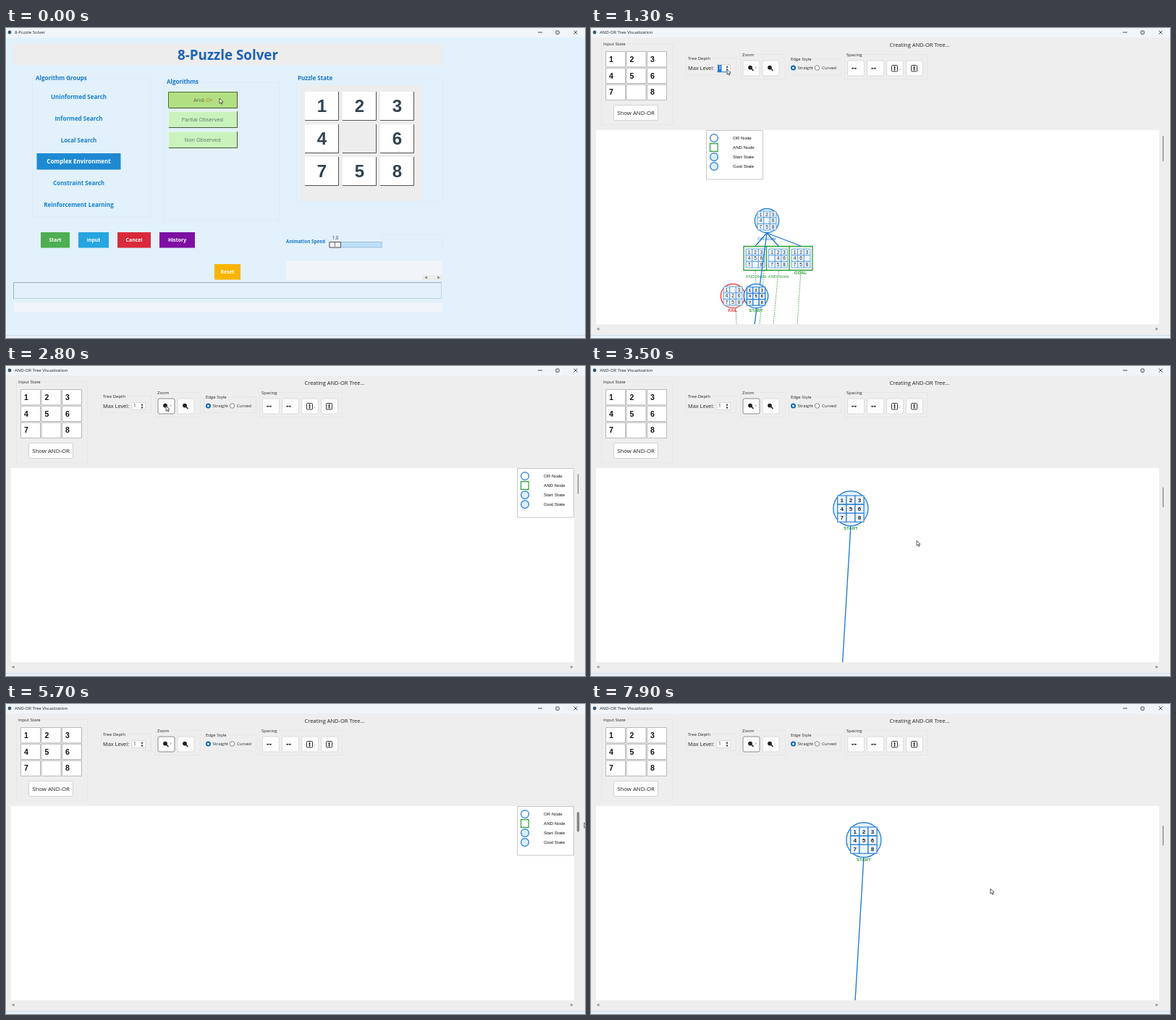
An HTML page with a canvas that plays this animation: 800x428 px, repeating every 8000 ms.

```html
<!DOCTYPE html>
<html lang="en">
<head>
<meta charset="utf-8">
<title>8-Puzzle Solver</title>
<style>
html, body { margin: 0; width: 100%; height: 100%; overflow: hidden; background: #e2f1fb; }
canvas { display: block; }
</style>
</head>
<body>
<canvas id="stage" width="800" height="428"></canvas>
<script>
const g = document.getElementById('stage').getContext('2d');
const LOOP = 8000;
const OPEN_AT = 400, MAX_AT = 800, REDRAW_AT = 1600, ZOOM_AT = [2600, 2800];
const UI = '"Open Sans", "Noto Sans", sans-serif';
const ARIAL = '"Liberation Sans", Arial, sans-serif';
const BLUE = '#1976d2', GREEN = '#2e9e3a', GREY = '#eeeeee', SKY = '#e2f1fb';

// Keyframes: [time, x, y]
const POINTER = [
  [0, 295, 97], [250, 295, 97], [650, 618, 19], [850, 618, 19], [1150, 188, 57],
  [1650, 188, 57], [2050, 790, 173], [2200, 790, 173], [2550, 221, 55], [2850, 221, 55],
  [3400, 450, 241], [3700, 450, 241], [4100, 470, 290], [4600, 420, 250], [5200, 790, 185],
  [5650, 799, 164], [5900, 799, 164], [6500, 620, 285], [6900, 587, 269], [7900, 552, 255]
];
const SCROLL = [
  [2850, 0, 0], [3450, 191, 274], [3800, 191, 274], [4600, 326, 340], [5500, 0, 0],
  [6000, 0, 0], [6850, 340, 108], [7000, 340, 108], [7850, 173, 283]
];

function at(keys, t) {
  let a = keys[0];
  for (const b of keys) {
    if (t < b[0]) {
      if (a === b) break;
      let k = (t - a[0]) / (b[0] - a[0]);
      k = k * k * (3 - 2 * k);
      return [a[1] + (b[1] - a[1]) * k, a[2] + (b[2] - a[2]) * k];
    }
    a = b;
  }
  return [a[1], a[2]];
}

function text(s, x, y, size, color = '#222', align = 'left', weight = 400, font = UI) {
  g.font = `${weight} ${size}px ${font}`;
  g.fillStyle = color;
  g.textAlign = align;
  g.textBaseline = 'middle';
  g.fillText(s, x, y + size * (font === UI ? .07 : .04));
}

function rect(x, y, w, h, fill, stroke, lw = 1, r = 0) {
  g.beginPath();
  g.roundRect(x, y, w, h, r);
  paint(fill, stroke, lw);
}

function circle(x, y, r, fill, stroke, lw = 1) {
  g.beginPath();
  g.arc(x, y, r, 0, 7);
  paint(fill, stroke, lw);
}

function paint(fill, stroke, lw) {
  if (fill) { g.fillStyle = fill; g.fill(); }
  if (stroke) { g.strokeStyle = stroke; g.lineWidth = lw; g.stroke(); }
}

function line(points, color, lw = 1, dash = []) {
  g.beginPath();
  for (let i = 0; i < points.length; i += 2) g.lineTo(points[i], points[i + 1]);
  g.setLineDash(dash);
  paint(null, color, lw);
  g.setLineDash([]);
}

function triangle(x, y, r, angle, color) {
  g.save();
  g.translate(x, y);
  g.rotate(angle);
  g.beginPath();
  g.moveTo(r, 0);
  g.lineTo(-r, -r);
  g.lineTo(-r, r);
  paint(color);
  g.restore();
}

function titleBar(title, x, y, buttons, color) {
  circle(x, y, 2.4, '#34566f');
  text(title, x + 7, y, 6, color);
  const [a, b, c] = buttons;
  line([a - 3, y, a + 3, y], color, .8);
  rect(b - 2.2, y - 2, 4.4, 4.4, null, color, .8, 1);
  line([c - 2.5, y - 2.5, c + 2.5, y + 2.5], color, .8);
  line([c - 2.5, y + 2.5, c + 2.5, y - 2.5], color, .8);
}

function group(x, y, w, h, color) {
  g.setLineDash([1, 1]);
  rect(x + .5, y + .5, w, h, null, color);
  g.setLineDash([]);
}

function solver() {
  rect(0, 13, 800, 415, SKY);
  rect(10, 22, 593, 29, '#ededed');
  text('8-Puzzle Solver', 306.5, 38, 18.8, '#1c63b8', 'center', 700);

  const edge = '#d6e6f0';
  group(36, 69, 163, 191, edge);
  group(217, 74, 160, 191, edge);
  group(401, 69, 202, 170, edge);
  group(520, 285, 83, 18, edge);
  for (const [s, x, y, w] of [['Algorithm Groups', 41, 69, 71], ['Algorithms', 222, 74, 46], ['Puzzle State', 403, 69, 50]]) {
    rect(x - 2, y - 4, w + 3, 8, SKY);
    text(s, x, y, 8, '#1976c8', 'left', 700);
  }

  rect(42.5, 173, 116, 22.5, '#1e8ad2');
  ['Uninformed Search', 'Informed Search', 'Local Search', 'Complex Environment', 'Constraint Search', 'Reinforcement Learning']
    .forEach((s, i) => text(s, 100.5, 95.7 + i * 29.7, 8, i === 3 ? '#fff' : '#1780cc', 'center', 700));

  ['', 'Partial Observed', 'Non Observed'].forEach((s, i) => {
    const y = 88 + Math.floor(i * 27.5);
    rect(224, y, 96, 23, i ? '#c9f2bd' : '#b2df82');
    line([224.5, y + 22, 224.5, y + .5, 319, y + .5], i ? '#e4f7dc' : '#4d6b35');
    line([225, y + 22.5, 319.5, y + 22.5, 319.5, y], '#46553f');
    text(s, 271.5, y + 11.6, 7.4, '#5d7263', 'center');
  });
  text('And-', 259, 99.6, 7.6, '#56653a');
  text('Or', 276.3, 99.6, 7.6, '#bf7a1c');

  rect(406, 79, 169, 160, '#ededed');
  [...'1234 6758'].forEach((d, i) => {
    const x = 413 + i % 3 * 52, y = 88 + Math.floor(i / 3) * 45;
    rect(x, y, 47, 40, d === ' ' ? '#ededed' : '#fff');
    line([x, y + 39.5, x + 46.5, y + 39.5, x + 46.5, y], '#555');
    text(d, x + 23.5, y + 20.4, 24, '#2f4250', 'center', 700, ARIAL);
  });

  for (const [s, x, y, w, color] of [
    ['Start', 48, 282, 40, '#4eae53'], ['Input', 100, 282, 42, '#26a5df'], ['Cancel', 154, 282, 46, '#d92a3b'],
    ['History', 212, 282, 49, '#7d10a2'], ['Reset', 288, 326, 36, '#f8b400']
  ]) {
    rect(x, y, w, 21.5, color);
    text(s, x + w / 2, y + 10.8, 6.9, '#fff', 'center', 700);
  }

  text('Animation Speed', 387, 295, 6.35, '#1976c8', 'left', 700);
  text('1.0', 455, 290.3, 6.2, '#333', 'center');
  rect(447, 295.5, 72, 7.5, '#bbdefb', '#9db4c5', .8);
  rect(447, 295.5, 15.5, 7.5, '#f2f6f8', '#444', .9);
  line([454.5, 296, 454.5, 302], '#555', .8);

  rect(387, 321, 216, 27, '#f1f5f9');
  rect(575, 341, 28, 7, '#ebebeb');
  triangle(580, 344.5, 1.9, Math.PI, '#888');
  triangle(598, 344.5, 1.9, 0, '#888');
  rect(10.5, 351.5, 591, 22, null, '#c8d3da');
  line([10.5, 374, 10.5, 351.5, 602, 351.5], '#a3aeb5');
  rect(11, 379, 592, 13, '#f0f5fa');
}

function grid(cells, x, y, cell, bold) {
  const left = x - cell * 1.5, top = y - cell * 1.5;
  [...cells].forEach((d, i) => {
    const cx = left + i % 3 * cell, cy = top + Math.floor(i / 3) * cell;
    rect(cx, cy, cell, cell, bold ? '#eef6fd' : '#f0f7fd', bold ? BLUE : '#4b95df', bold ? 1.1 : .8);
    text(d, cx + cell / 2, cy + cell / 2 + .2, cell * (bold ? .66 : .74), '#1b2530', 'center', bold ? 700 : 400, ARIAL);
  });
}

function startNode(x, y, k) {
  circle(x, y, 16.7 * k, '#e3f2fd', BLUE, 1.2);
  grid('1234567 8', x, y + .4, 8.4 * k, true);
  text('START', x, y + 16.7 * k + 3.2, 6, GREEN, 'center', 700, ARIAL);
}

function label(s, x, y, color, weight = 400) {
  text(s, x, y, 6, color, 'center', weight, ARIAL);
}

function fullTree() {
  const down = (x1, y1, x2, y2) => line([x1, y1, x2, y2], '#43a047', 1, [1.5, 1.5]);
  label('OR-Node', 243, 291, BLUE);
  for (const x of [227, 259, 290]) line([243, 283, x, 301], BLUE, 1.3);
  circle(243, 266, 16.7, '#e3f2fd', BLUE, 1.2);
  grid('1234 6758', 243, 266, 8.6);

  down(227, 335, 228, 354);
  down(239, 335, 233, 409);
  down(259, 335, 252, 409);
  down(290, 335, 285, 409);
  down(200, 387, 201, 409);
  ['1234567 8', '123 46758', '12346 758'].forEach((cells, i) => {
    const x = 227 + i * 31.5;
    rect(x - 16, 301.5, 32, 33, '#f4faf4', GREEN, 1.3);
    grid(cells, x, 318, 8.6);
  });
  label('AND-Node', 228, 342.8, GREEN);
  label('AND-Node', 259, 342.8, GREEN);
  label('GOAL', 289.5, 338, GREEN, 700);

  line([243, 283, 226, 409], BLUE, 1.3);
  circle(196, 370, 16.7, '#fdeaea', '#e53935', 1.2);
  grid('1 3426758', 196, 370, 8.6);
  label('FAIL', 196, 390, '#e53935', 700);
  startNode(228, 370, 1);
}

function legend(x, y) {
  rect(x + .5, y + .5, 78, 67.5, '#fff', '#c8c8c8');
  ['OR Node', 'AND Node', 'Start State', 'Goal State'].forEach((s, i) => {
    const cy = y + 11 + i * 13;
    if (i === 1) rect(x + 5.5, cy - 5.3, 10.6, 10.6, '#fff', GREEN, 1.2);
    else circle(x + 11, cy, 5.4, i ? '#dceefb' : '#fff', BLUE, 1.2);
    text(s, x + 37, cy + .3, 6.2, '#111', 'left', 400, ARIAL);
  });
}

function iconButton(x, active) {
  rect(x + .5, 45, 23, 21, '#fcfcfc', active ? '#8c8c8c' : '#dcdcdc', 1, 2);
}

function toolbar(t) {
  const edge = '#dfdfdf';
  for (const [s, x, y, w, h] of [
    ['Input State', 14, 21, 98, 112], ['Tree Depth', 131, 41, 69, 23], ['Zoom', 206, 36, 62, 34],
    ['Edge Style', 273, 42, 72, 22], ['Spacing', 350, 36, 114, 34]
  ]) {
    group(x, y, w, h, edge);
    g.font = `6px ${UI}`;
    rect(x + 2, y - 3, g.measureText(s).width + 3, 7, GREY);
    text(s, x + 3, y + .6, 6);
  }

  [...'1234567 8'].forEach((d, i) => {
    const x = 20 + i % 3 * 28.5, y = 32 + Math.floor(i / 3) * 22.8;
    rect(x + .5, y + .5, 27, 21.3, '#fff', '#b8b8b8');
    text(d, x + 5, y + 11.4, 10.5, '#111', 'left', 700, ARIAL);
  });
  rect(31.5, 106.5, 61, 21, '#fdfdfd', '#d4d4d4', 1, 1.5);
  text('Show AND-OR', 62, 117, 7.8, '#222', 'center');

  const level = t < 1200 ? 4 : t < 1400 ? 3 : t < REDRAW_AT ? 2 : 1;
  const editing = t >= 1200 && t < ZOOM_AT[0];
  text('Max Level:', 134, 55.7, 7.4);
  rect(174, 50.5, 18.5, 10, '#fff', '#d2d2d2', .8);
  if (editing) {
    rect(175, 51, 5.5, 9, '#1976d2');
    line([174, 60.7, 192.5, 60.7], '#1976d2', 1);
  }
  text(level, 177.8, 55.2, 6.5, editing ? '#fff' : '#222', 'center');
  triangle(188, 53.3, 1.5, -Math.PI / 2, '#333');
  triangle(188, 58, 1.5, Math.PI / 2, '#333');

  [209.5, 236.5].forEach((x, i) => {
    iconButton(x, !i && t >= ZOOM_AT[0]);
    circle(x + 10.5, 54.6, 2.9, '#222');
    line([x + 12, 56, x + 15, 59], '#222', 1.6);
    text(i ? '-' : '+', x + 17, 56, 4.5, '#1976d2');
  });
  circle(279.5, 55, 2.5, '#fff', '#0a6ab8', 2);
  text('Straight', 285.5, 55.2, 6);
  circle(312.5, 55, 3.2, '#fff', '#777', .9);
  text('Curved', 319, 55.2, 6);
  for (let i = 0; i < 4; i++) {
    const x = 354 + i * 27;
    iconButton(x);
    if (i < 2) {
      line([x + 6.5, 55.7, x + 12.5, 55.7], '#222', .8);
      triangle(x + 7, 55.7, 1.2, Math.PI, '#222');
      triangle(x + 12, 55.7, 1.2, 0, '#222');
    } else {
      rect(x + 7.5, 51.5, 8, 8.4, '#fff', '#333', 1, 1);
      line([x + 11.5, 53, x + 11.5, 58.3], '#222', .9);
      triangle(x + 11.5, 53.6, 1.3, -Math.PI / 2, '#222');
      triangle(x + 11.5, 57.8, 1.3, Math.PI / 2, '#222');
      text(i < 3 ? '+' : '-', x + 17.5, 57, 4, '#666');
    }
  }
}

function treeCanvas(t, w, h) {
  g.save();
  g.beginPath();
  g.rect(7, 141, w, h);
  g.clip();
  rect(7, 141, w, h, '#fff');
  if (t < REDRAW_AT) {
    fullTree();
    legend(159, 141);
  } else {
    const k = 1.2 ** ZOOM_AT.filter(z => t >= z).length;
    const [sx, sy] = at(SCROLL, t);
    const x = 7 + 377 * k - sx, y = 141 + 229 * k - sy;
    startNode(x, y, k);
    line([x, y + 16.7 * k, x - 24, y + 16.7 * k + 400], BLUE, 1.3);
    legend(706 - sx, 141 - sy);
  }
  g.restore();
}

function scrollbars(t) {
  const hover = at(POINTER, t)[0] > 780;
  const zoomed = t >= ZOOM_AT[1];
  const y = 149 + at(SCROLL, t)[1] / 14.9;
  const w = hover ? 3.4 : 1.3;
  rect(790.5 - w / 2, y, w, zoomed ? 27.5 : 35, '#858585', null, 1, w / 2);
  if (hover && !zoomed) {
    triangle(790.5, 144.5, 2.1, -Math.PI / 2, '#858585');
    triangle(790.5, 406.5, 2.1, Math.PI / 2, '#858585');
  }
  triangle(9.5, 415.5, 2, Math.PI, '#999');
  triangle(782, 415.5, 2, 0, '#999');
}

function floatingWindow(t) {
  rect(32.5, 13.5, 624, 411, GREY, '#d3d7da', 1, 2);
  titleBar('AND-OR Tree Visualization', 39.5, 21, [595, 619, 643.5], '#777');
  text('Creating AND-OR Tree...', 398, 41, 7.5, '#222', 'center');
  g.save();
  g.translate(31, 17);
  toolbar(t);
  treeCanvas(t, 603, 266);
  g.restore();
  rect(646, 166, 1.4, 24, '#777');
}

function maximizedWindow(t) {
  rect(0, 13, 800, 415, GREY);
  text('Creating AND-OR Tree...', 454, 24, 7.5, '#222', 'center');
  toolbar(t);
  treeCanvas(t, 778, 268);
  scrollbars(t);
}

function pointer(x, y) {
  g.beginPath();
  [[0, 0], [0, 7.2], [1.7, 5.7], [2.8, 8.1], [3.9, 7.6], [2.8, 5.3], [5, 5.1]].forEach(([a, b]) => g.lineTo(x + a, y + b));
  g.closePath();
  paint('#fff', '#333', .8);
}

function draw(now) {
  const t = now % LOOP;
  const max = t >= MAX_AT;
  if (max) maximizedWindow(t);
  else {
    solver();
    if (t >= OPEN_AT) floatingWindow(t);
  }
  rect(0, 0, 800, 13, '#f0f5fa');
  titleBar(max ? 'AND-OR Tree Visualization' : '8-Puzzle Solver', 5, 6, [738, 762, 787], '#222');
  rect(0, 424, 800, 4, '#e9f2f9');
  line([0, 424.5, 800, 424.5], '#cddcea');
  pointer(...at(POINTER, t));
  requestAnimationFrame(draw);
}
requestAnimationFrame(draw);
</script>
</body>
</html>
```
